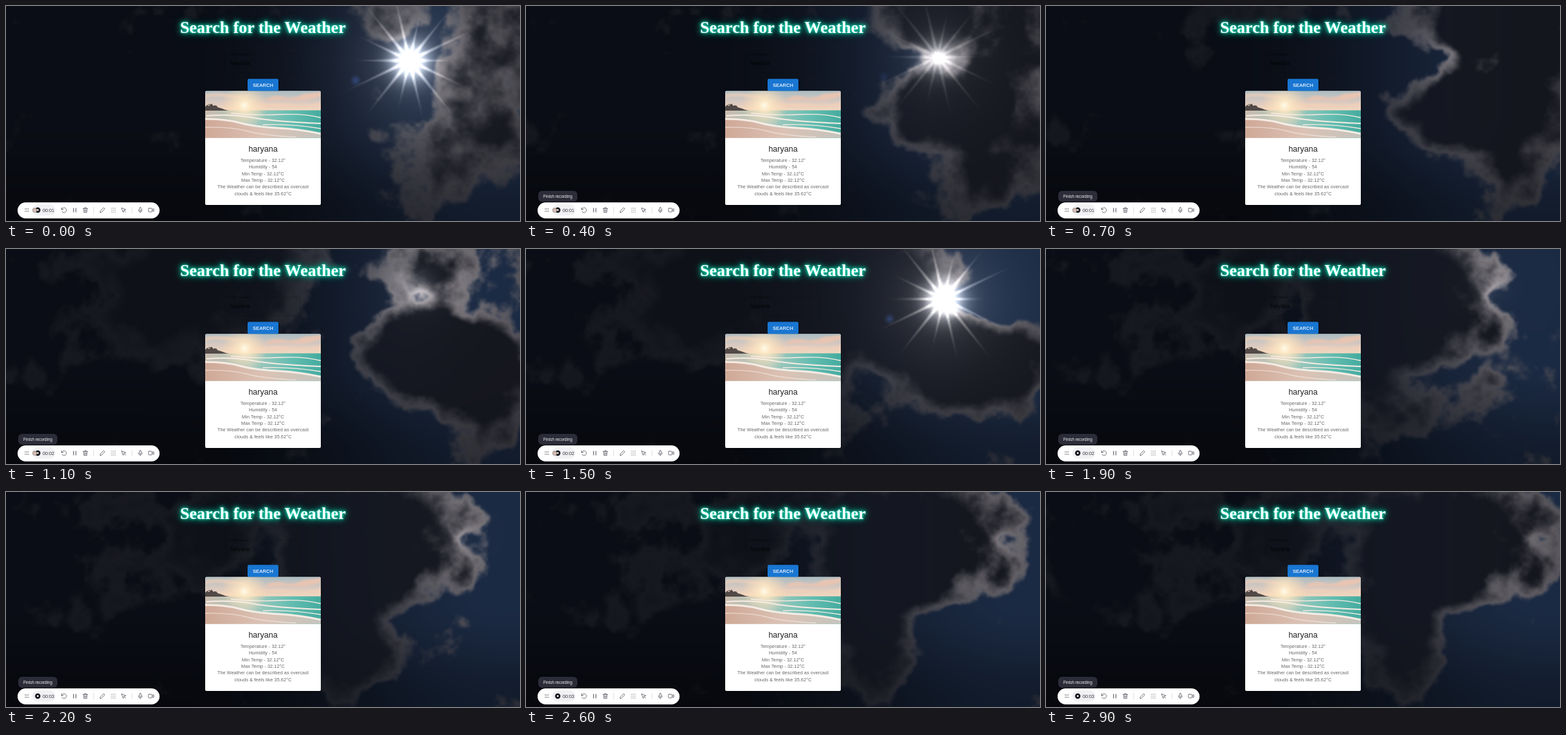
An HTML page with a canvas for the animation above (3 s loop, 800 px wide and 335 px high).

```html
<!DOCTYPE html>
<html lang="en">
<head>
<meta charset="utf-8">
<title>Weather search</title>
<style>
  html, body { margin: 0; width: 100%; height: 100%; overflow: hidden; background: #0b0e16; }
  #sky, #page { position: absolute; left: 0; top: 0; width: 800px; }
  #sky { height: 336px; }
  #page { height: 335px; font-family: "Liberation Sans", Arial, sans-serif; }
  .title {
    font: bold 26px "Liberation Serif", "Times New Roman", serif; fill: #fff;
    text-shadow: 0 0 2px #19e6c0, 0 0 5px #12d8b0, 0 0 9px #0fc9a4, 0 0 14px #0aa588;
  }
  .mid { text-anchor: middle; }
  .body { font-size: 7.3px; letter-spacing: .078px; fill: #666; }
  .icon { fill: none; stroke: #62626e; stroke-width: .9; stroke-linecap: round; stroke-linejoin: round; }
  .lift { filter: drop-shadow(0 1px 1.5px rgba(0,0,0,.45)); }
  #tip, #hand { animation: 3s step-end infinite; }
  #tip { animation-name: tip; }
  #hand { animation-name: hand; }
  @keyframes tip { 0% { opacity: 0 } 10% { opacity: 1 } }
  @keyframes hand { 0% { opacity: 1 } 56.667% { opacity: 0 } }
</style>
</head>
<body>
<canvas id="sky" width="400" height="168"></canvas>
<svg id="page" viewBox="0 0 800 335">
  <defs>
    <linearGradient id="air" x1="0" y1="0" x2="0" y2="1">
      <stop offset="0" stop-color="#a9bcc2"/><stop offset=".55" stop-color="#d9c9c0"/><stop offset="1" stop-color="#f7d9bd"/>
    </linearGradient>
    <linearGradient id="sea">
      <stop offset="0" stop-color="#c9bcae"/><stop offset=".4" stop-color="#a9c9bf"/><stop offset=".75" stop-color="#62bdb0"/><stop offset="1" stop-color="#45ab9f"/>
    </linearGradient>
    <linearGradient id="sand">
      <stop offset="0" stop-color="#cfa897"/><stop offset=".5" stop-color="#dcc2b4"/><stop offset="1" stop-color="#c3c4bd"/>
    </linearGradient>
    <radialGradient id="sun">
      <stop offset="0" stop-color="#fffbe8"/><stop offset=".25" stop-color="#ffe9c4" stop-opacity=".85"/><stop offset="1" stop-color="#ffd9b0" stop-opacity="0"/>
    </radialGradient>
    <clipPath id="media"><path d="M310 205.5V134.6a2 2 0 0 1 2-2h176a2 2 0 0 1 2 2v70.9z"/></clipPath>
    <filter id="soft"><feGaussianBlur stdDeviation="1.6"/></filter>
    <filter id="foam"><feGaussianBlur stdDeviation=".7"/></filter>
  </defs>

  <text class="title mid" x="400" y="41.5">Search for the Weather</text>

  <path d="M346 74.7h-2.2a2 2 0 0 0-2 2v25a2 2 0 0 0 2 2h112.400a2 2 0 0 0 2-2v-25a2 2 0 0 0-2-2H386" fill="none" stroke="#000" stroke-opacity=".25" stroke-width=".6"/>
  <text x="349" y="77.200" font-size="6.260" fill-opacity=".6">City Name *</text>
  <text x="349" y="92" font-size="8.350" fill-opacity=".87">haryana</text>

  <rect class="lift" x="310" y="132.600" width="180" height="177.400" rx="2" fill="#fff"/>
  <rect class="lift" x="376" y="113.600" width="48" height="19" rx="2" fill="#1976d2"/>
  <text class="mid" x="400.100" y="125.600" font-size="7.300" font-weight="500" letter-spacing=".21" fill="#fff" stroke="#fff" stroke-width=".15">SEARCH</text>

  <g clip-path="url(#media)">
    <path fill="url(#air)" d="M310 132h180v32H310z"/>
    <g filter="url(#soft)">
      <path fill="#e8c4b2" d="M405 145q14-7 28-3t30-5l27-3v7q-24 8-42 6t-43 1z"/>
      <path fill="#efd0ba" d="M390 155q30-6 55-2t45-3v7H390z"/>
      <path fill="#dfcabb" d="M310 137q22-4 44 1t34-2q-20 11-46 7t-32 3z"/>
    </g>
    <path fill="url(#sea)" d="M310 162.500h180V206H310z"/>
    <circle cx="371" cy="155" r="36" fill="url(#sun)"/>
    <path fill="#514a47" d="M310 163v-6l3-3 3 2 4-4 3 4 4-1 3 3 4 1 8 3 5 1z"/>
    <path d="M317 160v-7m-3 1 3-1 3 2m5 5v-5m-3 1 3-1 3 1" stroke="#514a47" stroke-width=".7" fill="none"/>
    <path fill="url(#sand)" d="M310 177q30-1 52 6t58 8 70 9v6H310z"/>
    <g fill="none" stroke="#f6ece4" filter="url(#foam)">
      <path stroke-width="3" d="M310 176q32 0 54 6t58 8 68 9"/>
      <path stroke-width="2.200" d="M312 171q40-3 72 3t106 9"/>
      <path stroke-width="1.300" d="M350 167q40 4 76 2t64 5M400 185q40-2 90 6"/>
      <path stroke-width="1.400" stroke-opacity=".65" d="M310 189q40-1 66 6t76 9"/>
    </g>
  </g>

  <text class="mid" x="400" y="226.500" font-size="12.520" fill="#212121">haryana</text>
  <g class="mid body">
    <text x="400" y="242.700">Temperature - 32.12°</text>
    <text x="400" y="253.100">Humidity - 54</text>
    <text x="400" y="263.600">Min Temp - 32.12°C</text>
    <text x="400" y="274">Max Temp - 32.12°C</text>
    <text x="400" y="284.400">The Weather can be described as overcast</text>
    <text x="400" y="294.900">clouds &amp; feels like 35.62°C</text>
  </g>

  <g id="tip">
    <rect x="19" y="288" width="61" height="17" rx="6" fill="#2b2c38"/>
    <text class="mid" x="49.500" y="298.800" font-size="6.300" fill="#f4f4f6">Finish recording</text>
  </g>

  <rect x="18" y="306" width="221" height="25" rx="12.500" fill="#fff"/>
  <path d="M30 316.300h6M30 319.700h6" stroke="#55555f" stroke-width="1.500" stroke-linecap="round" stroke-dasharray="0 2.300"/>
  <rect x="40.500" y="309.500" width="36.500" height="17" rx="8.500" fill="#f1f1f4"/>
  <circle cx="49.400" cy="318" r="4.200" fill="#16161c"/>
  <circle cx="49.400" cy="318" r="1.400" fill="#fff"/>
  <g id="hand">
    <circle cx="44.800" cy="318.200" r="3.200" fill="#e6d2c8" stroke="#7d675e" stroke-width=".8"/>
    <path d="M43.500 318.500l1.300-2 1.200 2.400" fill="none" stroke="#7d675e" stroke-width=".6"/>
  </g>
  <text id="clock" class="mid" x="66" y="320.600" font-size="7.200" fill="#30303a">00:01</text>
  <g class="icon">
    <path d="M86.500 314.500v2.700h2.700M86.800 317a3.700 3.700 0 1 1 .4 3"/>
    <path d="M105.200 315v6M108.800 315v6" stroke-width="1.200"/>
    <path d="M120 315.500h7M122.300 315.300v-1.200h2.400v1.200M120.800 315.500l.4 6.200h4.600l.4-6.200M122.700 317.300v2.700M124.300 317.300v2.700"/>
    <path d="M146.500 321.500l.5-2.300 5-5 1.800 1.800-5 5z"/>
    <path d="M164 315h6.500M164 318h6.500M164 321h6.500" stroke-width="1.200" stroke-dasharray="0 2.100"/>
    <path d="M180 314.700l6.500 2.500-2.800 1.100-1.100 2.800zM184 318.600l2.300 2.500"/>
    <rect x="207.600" y="314" width="2.800" height="4.800" rx="1.400"/>
    <path d="M206 317.700a3 3 0 0 0 6 0M209 320.800v1.300"/>
    <rect x="221.700" y="315.200" width="5.600" height="5.600" rx="1"/>
    <path d="M227.500 317.300l2.500-1.500v4.400l-2.500-1.500"/>
    <path d="M136.500 313.500v9M196 313.500v9" stroke="#dcdce2"/>
  </g>
</svg>

<script>
const LOOP = 3000, STEP = 100, W = 400, H = 168, N = 512;
const ctx = document.getElementById('sky').getContext('2d');
const clock = document.getElementById('clock');
const image = ctx.createImageData(W, H);
const clamp = (v, a = 0, b = 1) => Math.min(b, Math.max(a, v));
const mix = (a, b, k) => a + (b - a) * k;
const smooth = (a, b, v) => { const k = clamp((v - a) / (b - a)); return k * k * (3 - 2 * k); };

// Sun over time: seconds, x, y, light on the clouds, bare disc
const sunKeys = [
  [0, 628, 85, .7, 1], [.7, 650, 75, .8, 0], [1.1, 640, 60, 1, .15], [1.5, 650, 78, .7, 1],
  [1.9, 690, 55, .8, .05], [2.6, 705, 80, .65, 0], [3, 712, 92, .6, 0]
];

// Cloud banks: mid time, half life, x, y, rx, ry, drift per second, weight
const banks = [
  [0, .5, 760, 120, 90, 150, 30, .8], [0, .6, 585, 10, 70, 65, 60, .7], [0, .6, 690, 240, 130, 80, 40, .55],
  [.7, .45, 745, 65, 115, 110, 70, 1.2], [.7, .45, 615, 15, 90, 70, 70, 1], [.7, .6, 640, 155, 110, 60, 50, 1],
  [.8, .6, 765, 240, 90, 90, 30, .7], [1.1, .4, 645, 65, 80, 100, 60, .7], [1.15, .6, 680, 190, 150, 70, 50, .9],
  [1.2, .6, 330, 60, 170, 120, 40, .6], [1.5, .45, 590, 60, 90, 120, 50, .65], [1.5, .5, 690, 170, 120, 65, 40, .7],
  [1.9, .5, 610, 245, 110, 60, 40, .65], [2.4, 1.05, 615, 72, 140, 100, 90, 1.5], [2.4, 1.05, 535, 150, 95, 85, 70, 1],
  [2.2, 1.3, 400, 60, 120, 120, 50, .7], [2.3, 1.5, 230, 90, 140, 100, 35, .65], [2.6, .7, 530, 240, 75, 80, 30, .7]
];

// Tileable fractal noise from a seeded lattice
let seed = 7;
const rand = () => (seed = (seed * 16807) % 2147483647) / 2147483647;
const lattice = Float32Array.from({ length: 128 * 128 }, rand);
const noise = new Float32Array(N * N);
for (let cell = 32, amp = .5; cell >= 2; cell /= 2, amp *= .52) {
  const n = N / cell, at = (x, y) => lattice[(y % n % 128) * 128 + x % n % 128];
  for (let y = 0; y < N; y++) for (let x = 0; x < N; x++) {
    const i = Math.floor(x / cell), j = Math.floor(y / cell);
    const u = smooth(0, 1, x / cell - i), v = smooth(0, 1, y / cell - j);
    noise[y * N + x] += amp * (mix(mix(at(i, j), at(i + 1, j), u), mix(at(i, j + 1), at(i + 1, j + 1), u), v) - .5);
  }
}

function sunAt(t) {
  let i = 0;
  while (i < sunKeys.length - 2 && t >= sunKeys[i + 1][0]) i++;
  const a = sunKeys[i], b = sunKeys[i + 1], k = (t - a[0]) / (b[0] - a[0]);
  return a.slice(1).map((v, j) => mix(v, b[j + 1], k));
}

function drawClouds(t, [sx, sy, light, disc]) {
  const live = [];
  for (const [mid, life, x, y, rx, ry, vx, w] of banks) {
    const fade = clamp((life - Math.abs(t - mid)) / .25);
    if (fade > 0) live.push([x + vx * (t - mid), y, rx, ry, w * fade]);
  }
  const shift = Math.round(t * 32), px = image.data;
  for (let j = 0, p = 0; j < H; j++) for (let i = 0; i < W; i++, p += 4) {
    const x = i * 2, y = j * 2;
    let d = noise[((j + 60) % N) * N + (i - shift + N) % N] * 1.7 - .22;
    for (const [cx, cy, rx, ry, w] of live) {
      const u = (x - cx) / rx, v = (y - cy) / ry, q = 1 - (u * u + v * v) / 1.6;
      if (q > 0) d += w * q;
    }
    const r = Math.hypot(x - sx, y - sy), right = smooth(280, 780, x);
    const low = 1 - .35 * smooth(170, 335, y);
    const lit = (.24 + 1.05 * light * Math.exp(-r / 115)) * mix(.55, 1, right) * low;
    const cover = smooth(-.02, .25, d), shade = 1 - smooth(.12, .75, d);
    const glow = disc * (230 * Math.exp(-r * r / 750) + 75 * Math.exp(-r / 55));
    const tone = (sky, core, bright) =>
      mix(mix(sky[0], sky[1], right) * low, core + (bright - core) * shade * lit, cover * mix(.45, .95, right)) + glow;
    px[p] = tone([10, 27], 20, 172);
    px[p + 1] = tone([13, 42], 21, 164);
    px[p + 2] = tone([21, 67], 28, 166);
    px[p + 3] = 255;
  }
  ctx.putImageData(image, 0, 0);
}

function drawRays([sx, sy, , disc]) {
  if (disc < .2) return;
  ctx.save();
  ctx.scale(.5, .5);
  ctx.globalCompositeOperation = 'lighter';
  ctx.translate(sx, sy);
  for (let i = 0; i < 14; i++) {
    const len = 70 + 55 * Math.abs(Math.sin(i * 2.3)), fill = ctx.createLinearGradient(0, 0, len, 0);
    fill.addColorStop(0, `rgba(255,245,230,${.5 * disc})`);
    fill.addColorStop(1, 'rgba(200,190,190,0)');
    ctx.fillStyle = fill;
    ctx.beginPath();
    ctx.moveTo(0, -3);
    ctx.lineTo(len, 0);
    ctx.lineTo(0, 3);
    ctx.fill();
    ctx.rotate(Math.PI / 7);
  }
  const flare = ctx.createRadialGradient(-84, 31, 0, -84, 31, 9);
  flare.addColorStop(0, `rgba(35,60,130,${.5 * disc})`);
  flare.addColorStop(1, 'rgba(35,60,130,0)');
  ctx.fillStyle = flare;
  ctx.fillRect(-95, 20, 22, 22);
  ctx.restore();
}

let last = -1;
function tick() {
  const now = document.timeline.currentTime ?? performance.now();
  const step = Math.floor((now % LOOP) / STEP);
  if (step !== last) {
    last = step;
    const t = step * STEP / 1000, sun = sunAt(t);
    drawClouds(t, sun);
    drawRays(sun);
    clock.textContent = '00:0' + (1 + Math.floor(t));
  }
  requestAnimationFrame(tick);
}
// Keep the style animations on the same clock as the sky
for (const a of document.getAnimations()) a.startTime = 0;
tick();
</script>
</body>
</html>
```
